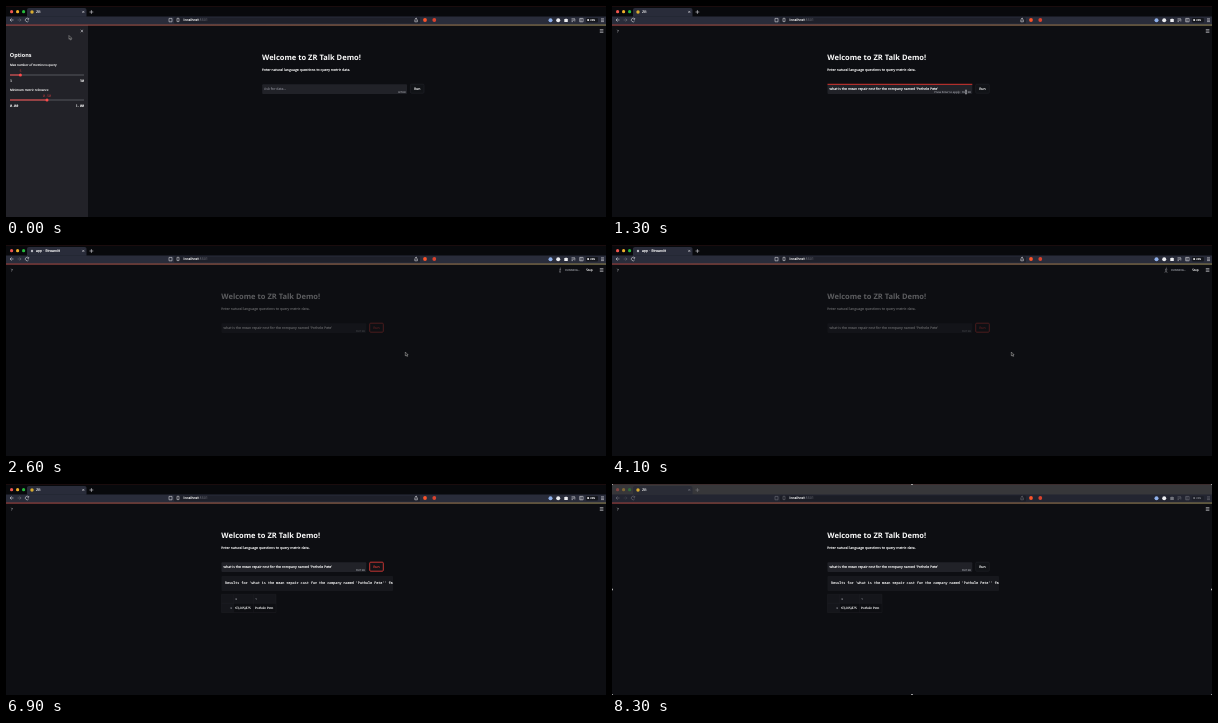
An HTML page that plays this animation: 600x211 px, repeating every 8.6 s.

```html
<!DOCTYPE html>
<html lang="en">
<head>
<meta charset="utf-8">
<title>Metric chat demo</title>
<style>
html, body { margin: 0; width: 100%; height: 100%; overflow: hidden; background: #0d0e12; }
svg { display: block; width: 100vw; height: 100vh; }
text { font: 3.48px "Open Sans", "Noto Sans", sans-serif; fill: #fafafa; stroke: #fafafa; stroke-width: .12; text-rendering: geometricPrecision; white-space: pre; }
.h1 { font-size: 7.54px; font-weight: 700; stroke: none; }
.h2 { font-size: 5.5px; font-weight: 700; stroke: none; }
.label { font-size: 3.1px; }
.tiny { font-size: 2.75px; fill: #8b8d94; stroke: #8b8d94; }
.ui { font: 3.5px Inter, sans-serif; }
.mono { font: 3.42px "Noto Sans Mono", "DejaVu Sans Mono", monospace; }
.end { text-anchor: end; }
.mid { text-anchor: middle; }
.red { fill: #c23c3e; stroke: none; }
.line { fill: none; stroke: #d5d6da; stroke-width: .6; }
</style>
</head>
<body>
<svg viewBox="0 0 600 211" preserveAspectRatio="none">
  <defs>
    <linearGradient id="shine"><stop stop-color="#c0504e"/><stop offset="1" stop-color="#aea066"/></linearGradient>
    <clipPath id="codeClip"><rect x="215.5" y="92" width="171.5" height="15"/></clipPath>
  </defs>
  <rect width="600" height="211" fill="#0d0e12"/>

  <g id="main">
    <text class="h1" x="215.3" y="53.9">Welcome to ZR Talk Demo!</text>
    <text x="215.3" y="64.5">Enter natural language questions to query metric data.</text>
    <rect x="215.5" y="78.3" width="144.8" height="9.6" rx="1" fill="#212228"/>
    <path id="focus" d="M215.5 78.3H360.3" stroke="#d8342f" stroke-width="1"/>
    <text id="query" x="217.4" y="84.4"></text>
    <text id="count" class="tiny end" x="358.8" y="86.7"></text>
    <rect id="button" x="363.7" y="78.2" width="13.6" height="9" rx="1" fill="#111317"/>
    <text id="run" class="mid" x="370.4" y="84.1">Run</text>
    <g id="result">
      <rect x="215.5" y="92" width="171.5" height="15" rx="1" fill="#17181d"/>
      <text class="mono" x="219" y="100.4" clip-path="url(#codeClip)">Results for 'what is the mean repair cost for the company named 'Pothole Pete'' feature</text>
      <path d="M215.5 110.3H270V119.3H227.7V128.5H215.5Z" fill="#15161b"/>
      <path class="line" d="M215.5 110.3H270V128.5H215.5ZM215.5 119.3H270M227.7 110.3V128.5M247.4 110.3V128.5" style="stroke:#24252b;stroke-width:.35"/>
      <text class="tiny" x="229.4" y="115.9">0</text>
      <text class="tiny" x="249.2" y="115.9">1</text>
      <text class="tiny end" x="226.2" y="124.9">0</text>
      <text class="label" x="229.2" y="124.9">63,205,875</text>
      <text class="label" x="249" y="124.9">Pothole Pete</text>
    </g>
  </g>

  <path id="expand" class="line" d="M5.3 23.8L6.5 25L5.3 26.2"/>
  <path class="line" d="M593.8 23.6H597.4M593.8 25H597.4M593.8 26.4H597.4"/>
  <g id="status">
    <path id="runner" class="line" style="stroke:#96979c;stroke-width:.5"/>
    <text class="tiny" x="559" y="26">RUNNING...</text>
    <text class="label" x="580.2" y="26">Stop</text>
  </g>

  <g id="sidebar">
    <rect y="19" width="82" height="192" fill="#222228"/>
    <path class="line" d="M74.7 23.8L77.1 26.2M77.1 23.8L74.7 26.2"/>
    <text class="h2" x="3.8" y="51.2">Options</text>
    <text class="label" x="4" y="60">Max number of metrics to query</text>
    <text class="mono red mid" x="14.4" y="66.3">5</text>
    <path d="M4 69H78" stroke="#55565c"/>
    <path d="M4 69H14.4" stroke="#f04848"/>
    <circle cx="14.4" cy="69" r="1.5" fill="#ff4b4b"/>
    <text class="mono" x="4" y="76">1</text>
    <text class="mono end" x="78" y="76">30</text>
    <text class="label" x="4" y="84.9">Minimum metric relevance</text>
    <text class="mono red mid" x="41" y="91">0.50</text>
    <path d="M4 94H78" stroke="#55565c"/>
    <path d="M4 94H41" stroke="#f04848"/>
    <circle cx="41" cy="94" r="1.5" fill="#ff4b4b"/>
    <text class="mono" x="4" y="101">0.00</text>
    <text class="mono end" x="78" y="101">1.00</text>
  </g>

  <g id="browser">
    <rect id="strip" width="600" height="11"/>
    <rect id="bar" y="10.5" width="600" height="8.2"/>
    <path id="tab" d="M21 10.8V4Q21 2 23 2H78.5Q80.5 2 80.5 4V10.8Z"/>
    <g id="lights">
      <circle cx="5.6" cy="5.7" r="1.6" fill="#f0564e"/>
      <circle cx="11.6" cy="5.7" r="1.6" fill="#eeb02b"/>
      <circle cx="17.6" cy="5.7" r="1.6" fill="#27ba3d"/>
    </g>
    <circle id="icon" cx="26" cy="6"/>
    <text id="title" class="ui" x="30" y="7.2"></text>
    <rect id="address" x="168" y="11.6" width="246" height="6" rx="1"/>
    <circle cx="419" cy="14" r="1.9" fill="#fb542b"/>
    <circle cx="428.3" cy="14" r="1.9" fill="#d9432f"/>
    <circle cx="544.5" cy="14.2" r="2" fill="#8fb0ea"/>
    <circle cx="552.2" cy="14.2" r="2" fill="#ecedf0"/>
    <text class="ui" x="177.6" y="15.3">localhost<tspan fill="#73757f" stroke="none">:8501</tspan></text>
    <g id="controls">
      <path class="line" d="M76.3 4.9L78.3 6.9M78.3 4.9L76.3 6.9M83.5 6H87.3M85.4 4.1V7.9"/>
      <path class="line" d="M7.5 14H4M5.6 12.4L4 14L5.6 15.6M22.6 13A1.8 1.8 0 1 0 22.7 14.8M22.7 12V13.3H21.4"/>
      <path class="line" opacity=".35" d="M11.6 14H15.1M13.5 12.4L15.1 14L13.5 15.6"/>
      <path class="line" d="M163 12.4H166V15.8H163ZM171 12.3H173V15.6H171ZM408.8 13.5V15.8H411.4V13.5M410.1 14.7V12M409.2 12.8L410.1 12L411 12.8"/>
      <path d="M558.3 13H559.3A.8 .8 0 0 1 560.8 13H561.8V16H558.3Z" fill="#ecedf0"/>
      <path class="line" d="M565.5 12.8H569M565.5 14.2H568M565.5 15.6H567M568.8 13V15.5M573.7 12.4H577.1V15.8H573.7ZM575 12.4V15.8"/>
      <rect x="580" y="11.9" width="12" height="4.7" rx="1" fill="#15171d"/>
      <text class="ui" style="font-size:2.5px" x="581" y="15.2">● VPN</text>
      <path class="line" d="M595 12.8H598M595 14.2H598M595 15.6H598"/>
    </g>
    <rect y="18.6" width="600" height=".9" fill="url(#shine)"/>
    <path d="M0 .2H600" stroke="#4a1512" stroke-width=".4"/>
  </g>

  <path id="handles" d="M0 0h0M300 0h0M600 0h0M0 105.5h0M600 105.5h0M0 211h0M300 211h0M600 211h0" stroke="#c8c8c8" stroke-width="2" stroke-linecap="round"/>
  <path id="arrow" d="M0 0V3.8L.9 3L1.6 4.5L2.3 4.2L1.7 2.8H2.8Z" fill="#111" stroke="#d8d8d8" stroke-width=".4"/>
  <path id="beam" class="line" d="M-.9 -1.8H.9M0 -1.8V1.8M-.9 1.8H.9"/>
</svg>
<script>
const LOOP = 8600, STEP = 100;
const QUERY = "what is the mean repair cost for the company named 'Pothole Pete'";
// time, x, y of the pointer
const PATH = [[0, 63, 29.5], [200, 76, 23.5], [500, 76, 23.5], [900, 354, 86], [1300, 354, 86],
  [1500, 370, 83], [1700, 371, 84], [2100, 399.3, 107], [6500, 399.3, 107], [6800, 478, 108]];

const $ = id => document.getElementById(id);
const set = (id, attrs) => { for (const k in attrs) $(id).setAttribute(k, attrs[k]); };
const show = (id, on) => set(id, { opacity: +on });
const ink = (id, color) => { $(id).style.fill = $(id).style.stroke = color; };
const ramp = (t, a, b) => Math.min(1, Math.max(0, (t - a) / (b - a)));
const ease = p => p * p * (3 - 2 * p);

function pointer(t) {
  const i = PATH.findIndex(p => p[0] > t);
  if (i < 0) return PATH.at(-1).slice(1);
  const [a, x, y] = PATH[i - 1], [b, u, v] = PATH[i];
  const p = ease(ramp(t, a, b));
  return [x + (u - x) * p, y + (v - y) * p];
}

function runnerPath(t) {
  const s = 1.3 * Math.sin(t / STEP * 1.1), lift = .3 * Math.cos(t / STEP * 2.2);
  const hip = 25.4 + lift;
  return `M554.1 ${22.5 + lift}h.5M554.3 23.3L554 ${hip}L${554 + s} ${27.7 - lift}` +
    `M554 ${hip}L${554 - s} 27.7M${554.2 - s} 24.8L554.2 23.8L${554.2 + s} 24.6`;
}

function draw(t) {
  const slide = ease(ramp(t, 300, 700));
  const typed = t >= 1200, editing = t >= 900 && t < 1500;
  const pressed = t >= 1500 && t < 7400;
  const loading = t >= 1700 && t < 4500;
  const blurred = t >= 7400;

  set("sidebar", { transform: `translate(${-82 * slide})` });
  set("main", {
    transform: `translate(${40.7 * (1 - slide)})`,
    opacity: 1 - .67 * (ramp(t, 2100, 2500) - ramp(t, 4300, 4700))
  });
  show("expand", slide === 1);

  $("query").textContent = typed ? QUERY : editing ? "" : "Ask for data...";
  ink("query", typed ? "#fafafa" : "#777982");
  $("count").textContent = (typed && editing ? "Press Enter to apply · " : "") + (typed ? "65/100" : "0/100");
  show("focus", editing);
  set("button", { stroke: pressed ? "#d93a36" : "#24262c", "stroke-width": pressed ? .9 : .5 });
  ink("run", pressed ? "#d93a36" : "#fafafa");
  set("result", { opacity: ramp(t, 5700, 6000) });

  show("status", t >= 1600 && t < 6300);
  set("runner", { d: runnerPath(t) });

  $("title").textContent = loading ? "app · Streamlit" : "ZR";
  set("icon", { fill: loading ? "#b9bac2" : "#d9ac30", r: loading ? 1.2 : 1.7 });
  set("strip", { fill: blurred ? "#37373a" : "#08090c" });
  set("bar", { fill: blurred ? "#232531" : "#292c3a" });
  set("tab", { fill: blurred ? "#2a2c36" : "#292c3a" });
  set("address", { fill: blurred ? "#1b1d26" : "#1e202a" });
  set("controls", { opacity: blurred ? .4 : 1 });
  set("lights", { opacity: blurred ? .4 : 1 });
  set("handles", { opacity: ramp(t, 7500, 8300) });

  const at = `translate(${pointer(t)})`, overInput = t >= 900 && t < 1400;
  set("arrow", { transform: at });
  set("beam", { transform: at });
  show("arrow", !overInput && t < 6900);
  show("beam", overInput);
}

const start = performance.now();
function tick() {
  const t = (performance.now() - start) % LOOP;
  draw(Math.floor(t / STEP) * STEP);
  requestAnimationFrame(tick);
}
tick();
</script>
</body>
</html>
```
